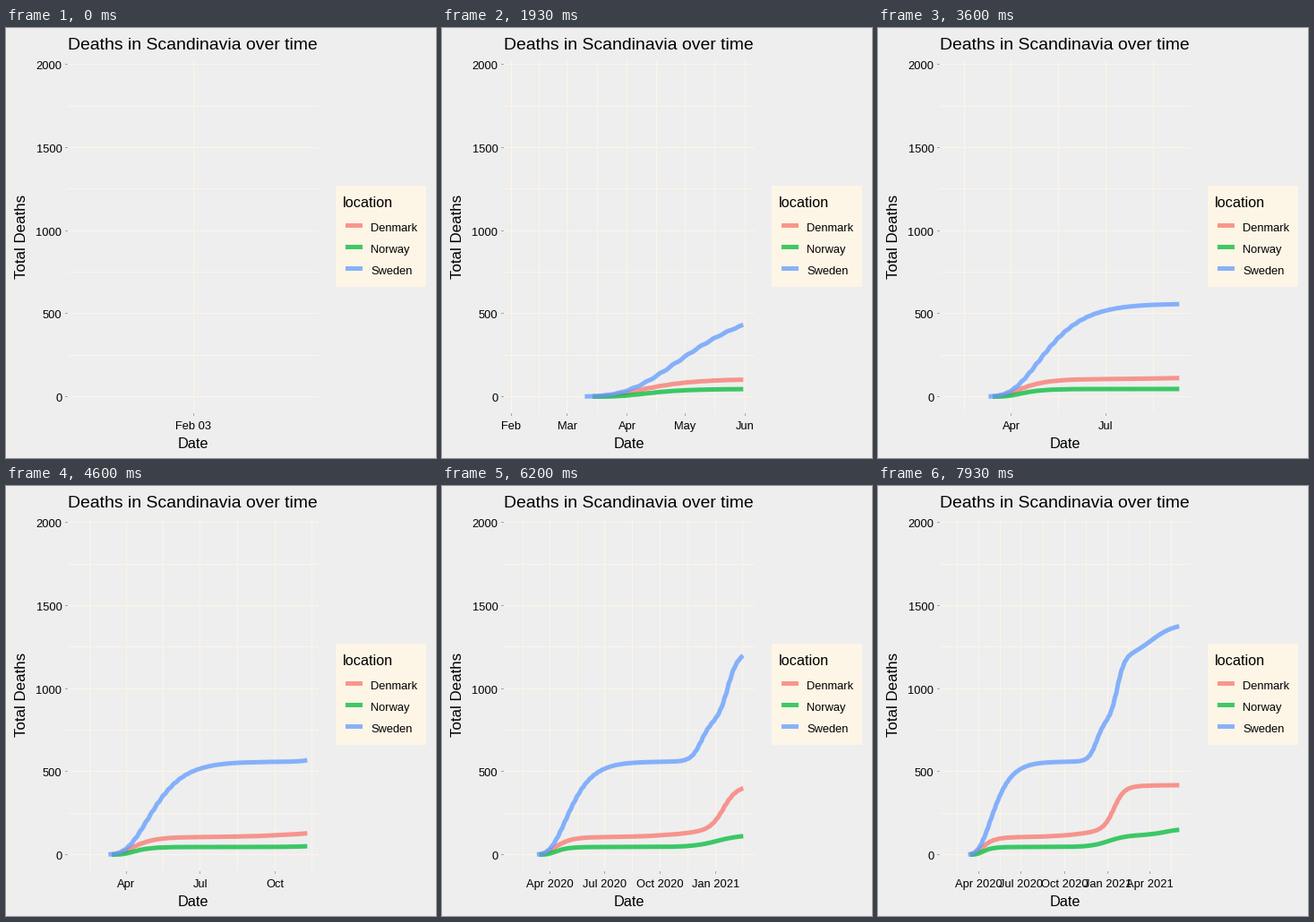
Write a matplotlib script that moves like this. It is 480 px wide and 480 px high and loops after 8 s.

```python
import math

import numpy as np
import matplotlib.pyplot as plt
from matplotlib.animation import FuncAnimation
from matplotlib.patches import Rectangle

SIZE, DPI = 480, 100
TICKS, INTERVAL = 400, 20
VIEW_MS = 200 / 3
DAYS_PER_VIEW = 4.08
LEFT, RIGHT, TOP, BOTTOM = 69, 349, 36, 430
PAD = (RIGHT - LEFT) / 22
ZERO_Y, UNIT_Y = 411.5, 0.1853
PAPER, CREAM, TICK = "#eeeeee", "#fdf5e6", "#a8a8a8"
START = np.datetime64("2020-02-03")

plt.rcParams["font.family"] = "Liberation Sans"
PT = 72 / DPI


def outbreak(t, total, centre, width):
    """Fast rise with a long tail."""
    return total * np.exp(-np.exp((centre - t) / width))


def wave(t, total, centre, width):
    """Symmetric S-curve."""
    return total / (1 + np.exp((centre - t) / width))


# Cumulative deaths per million; times are days since START
def denmark(t):
    return outbreak(t, 105, 64, 16) + wave(t, 60, 300, 40) + wave(t, 254, 346, 11)


def norway(t):
    return outbreak(t, 46, 66, 13) + wave(t, 72, 335, 20) + wave(t, 38, 455, 18)


def sweden(t):
    return (outbreak(t, 560, 83.5, 25.6) + wave(t, 240, 309, 8.5)
            + wave(t, 385, 353, 8) + wave(t, 208, 425, 25))


SERIES = {
    "Denmark": ("#F8766D", 40, denmark),
    "Norway": ("#00BA38", 40, norway),
    "Sweden": ("#619CFF", 36, sweden),
}

fig = plt.figure(figsize=(SIZE / DPI, SIZE / DPI), dpi=DPI, facecolor=PAPER)
ax = fig.add_axes([0, 0, 1, 1])
ax.set_xlim(0, SIZE)
ax.set_ylim(SIZE, 0)
ax.axis("off")


def put(x, y, text, px, ha="left", **kw):
    return ax.text(x, y, text, fontsize=px * PT, ha=ha, va="baseline", **kw)


def stroke(xs, ys, color, px, z, **kw):
    return ax.plot(xs, ys, color=color, lw=px * PT, zorder=z, snap=False,
                   solid_capstyle="butt", solid_joinstyle="round", **kw)[0]


def curve(xs, ys, color, z):
    return stroke(xs, ys, color, 5, z, alpha=0.75)


def hline(x0, x1, y, color):
    y = math.floor(y) + 0.5
    return stroke([x0, x1], [y, y], color, 1, 1)


def vline(x, y0, y1, color):
    x = math.floor(x) + 0.5
    return stroke([x, x], [y0, y1], color, 1, 1)


def value_y(v):
    return ZERO_Y - UNIT_Y * v


def month_start(k):
    first = (np.datetime64("2020-01") + k).astype("datetime64[D]")
    return int((first - START).astype(int))


def daily(by):
    return lambda lo: [by * (lo // by + k) if by == 7 else lo + by * k
                       for k in range(40)]


def monthly(by):
    return lambda lo: [month_start(k) for k in range(-12, 30, by)]


def half_monthly(lo):
    return sorted(m + d for m in monthly(1)(lo) for d in (0, 14))


MONTH = 365.25 / 12
STEPS = [(1, daily(1)), (2, daily(2)), (7, daily(7)),
         (MONTH / 2, half_monthly), (MONTH, monthly(1)),
         (3 * MONTH, monthly(3)), (6 * MONTH, monthly(6))]


def breaks_for(i, lo, hi):
    grid = STEPS[i][1](math.floor(lo))
    first = max(k for k, t in enumerate(grid) if t <= lo)
    last = min(k for k, t in enumerate(grid) if t >= hi)
    return grid[first:last + 1]


def pretty_dates(lo, hi, n=5):
    """Pick the date step whose interval count is closest to n."""
    i = min(range(len(STEPS)), key=lambda k: abs((hi - lo) / STEPS[k][0] - n))
    at = breaks_for(i, lo, hi)
    count = len(at) - 1
    if count != n:
        j = min(i + 1, len(STEPS) - 1) if count > n else max(i - 1, 0)
        other = breaks_for(j, lo, hi)
        if abs(len(other) - 1 - n) < abs(count - n):
            return j, other
    return i, at


def date_label(t, step, span):
    year, month, day = str(START + int(t)).split("-")
    name = "JanFebMarAprMayJunJulAugSepOctNovDec"[3 * int(month) - 3:][:3]
    if STEPS[step][0] < MONTH:
        return f"{name} {day}"
    return f"{name} {year}" if span > 370 else name


def draw_static():
    for v in range(0, 2001, 250):
        y = value_y(v)
        hline(LEFT, RIGHT, y, CREAM)
        if v % 500 == 0:
            hline(LEFT - 3, LEFT, y, TICK)
            put(62.5, y + 5.3, str(v), 12.9, "right")

    put(69, 24, "Deaths in Scandinavia over time", 19.35)
    put(209, 469, "Date", 16.2, "center")
    put(22, 232.5, "Total Deaths", 16.9, "center", rotation=90,
        rotation_mode="anchor")

    ax.add_patch(Rectangle((368, 176), 101, 113, fc=CREAM, ec="none"))
    put(375.5, 200, "location", 16.3)
    for k, (name, (color, *_)) in enumerate(SERIES.items()):
        y = 220.5 + 24 * k
        curve([379, 398], [y, y], color, 4)
        put(407.5, y + 6.5, name, 12.9)


draw_static()
lines = {name: curve([], [], color, 4 + k)
         for k, (name, (color, *_)) in enumerate(SERIES.items())}
axis_parts = []


def draw_axis(days):
    """Redraw the date axis and return the day-to-pixel mapping."""
    while axis_parts:
        axis_parts.pop().remove()

    if days == 0:
        lo, hi, step, at = -0.5, 0.5, 0, [0]
    else:
        lo, hi = -0.05 * days, 1.05 * days
        step, at = pretty_dates(lo, hi)

    def x_of(t):
        return LEFT + (t - lo) * (RIGHT - LEFT) / (hi - lo)

    for t in [(a + b) / 2 for a, b in zip(at, at[1:])] + at:
        if lo <= t <= hi:
            axis_parts.append(vline(x_of(t), TOP, BOTTOM, CREAM))
    for t in at:
        if lo <= t <= hi:
            x = x_of(t)
            axis_parts.append(vline(x, BOTTOM, BOTTOM + 3, TICK))
            axis_parts.append(
                put(x, 448, date_label(t, step, hi - lo), 12.9, "center"))
    return x_of


def update(tick):
    view = int((tick + 0.75) * INTERVAL / VIEW_MS)
    days = int(DAYS_PER_VIEW * view)
    x_of = draw_axis(days)
    for name, (_, first, total) in SERIES.items():
        t = np.arange(first, days + 1)
        # reporting slows down every weekend
        reported = t - 0.4 * np.sin(2 * np.pi * (t + 0.5) / 7)
        lines[name].set_data(x_of(t), value_y(total(reported)))
    return list(lines.values()) + axis_parts


anim = FuncAnimation(fig, update, frames=TICKS, interval=INTERVAL,
                     repeat=True, repeat_delay=0, blit=False)
plt.show()
```
